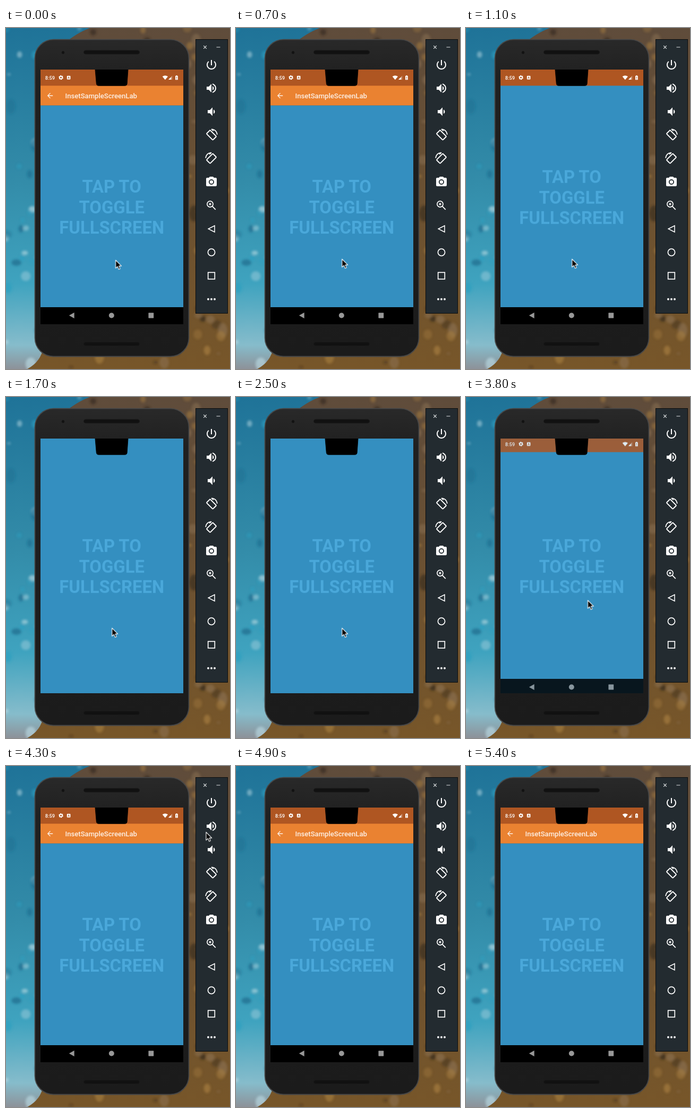
Animation of 422 by 640 pixels, one loop 5500 ms. Source, as an HTML page:

```html
<!DOCTYPE html>
<html lang="en">
<head>
<meta charset="utf-8">
<title>Fullscreen toggle</title>
<style>
  html, body { margin: 0; width: 100%; height: 100%; overflow: hidden; background: #6b4f30; }
  svg { display: block; position: absolute; left: 0; top: 0; }
  text { font-family: Roboto, sans-serif; }
  .label { font-weight: 700; font-size: 32.8px; text-anchor: middle; fill: #4aa8da; }
  .title { font-weight: 500; font-size: 13.1px; fill: #fdf0e6; }
  .clock { font-weight: 500; font-size: 9.3px; fill: #fff; }
  .line { fill: none; stroke: #fff; stroke-width: 1.7; }
</style>
</head>
<body>
<svg width="422" height="640" viewBox="0 0 422 640">
  <defs>
    <linearGradient id="sea" x2="0" y2="1">
      <stop offset="0" stop-color="#1f7398"/>
      <stop offset=".45" stop-color="#338ca9"/>
      <stop offset=".75" stop-color="#3fa3bf"/>
      <stop offset=".93" stop-color="#86bccb"/>
      <stop offset="1" stop-color="#8d9299"/>
    </linearGradient>
    <linearGradient id="rock" x2="0" y2="1">
      <stop offset="0" stop-color="#5f4c3b"/>
      <stop offset="1" stop-color="#775629"/>
    </linearGradient>
    <linearGradient id="shell" x2="0" y2="1">
      <stop offset="0" stop-color="#292929"/>
      <stop offset=".12" stop-color="#202020"/>
      <stop offset="1" stop-color="#1b1b1b"/>
    </linearGradient>
    <filter id="soft" x="-50%" y="-50%" width="200%" height="200%"><feGaussianBlur stdDeviation="2"/></filter>
    <clipPath id="screen"><rect x="65" y="78" width="269" height="478"/></clipPath>
    <clipPath id="water"><path id="coast" d="M0 0H158Q122 14 100 40L70 600Q66 626 40 640H0Z"/></clipPath>
  </defs>

  <rect width="422" height="640" fill="url(#rock)"/>
  <g id="land" filter="url(#soft)"></g>
  <use href="#coast" fill="url(#sea)"/>
  <g clip-path="url(#water)"><g id="foam" filter="url(#soft)"></g></g>

  <rect x="54.5" y="21.7" width="290" height="594.8" rx="35" fill="url(#shell)" stroke="#474747" stroke-width="1.8"/>
  <g fill="#111" stroke="#191919">
    <rect x="146.5" y="42" width="105" height="7" rx="3.5"/>
    <rect x="146.5" y="589.5" width="105" height="7" rx="3.5"/>
    <circle cx="107.5" cy="46" r="2.5"/>
  </g>

  <g clip-path="url(#screen)">
    <rect x="65" y="78" width="269" height="478" fill="#348fc0"/>
    <g id="label" class="label">
      <text x="199.2" y="309">TAP TO</text>
      <text x="199.2" y="347.5">TOGGLE</text>
      <text x="199.2" y="386">FULLSCREEN</text>
    </g>
    <g id="appBar">
      <rect x="65" y="145" width="269" height="1" fill="#2c7199" opacity=".6"/>
      <rect x="65" y="108" width="269" height="37.3" fill="#ea8231"/>
      <path transform="translate(75.2 119.2) scale(.65)" fill="#fdf0e6" d="M20 11H7.83l5.59-5.59L12 4l-8 8 8 8 1.41-1.41L7.83 13H20z"/>
      <text class="title" x="111.5" y="132">InsetSampleScreenLab</text>
    </g>
    <g id="status">
      <rect x="65" y="78" width="269" height="30.3" fill="#af5622"/>
      <text class="clock" x="73.7" y="96.5">8:59</text>
      <g fill="none" stroke="#fff">
        <circle cx="103.5" cy="93" r="2.5" stroke-width="1.8"/>
        <circle cx="103.5" cy="93" r="3.6" stroke-width="1.4" stroke-dasharray="1.9 1.87"/>
      </g>
      <rect x="114.8" y="89.7" width="6.6" height="6.8" rx="1" fill="#fff"/>
      <path d="M116.6 95L118.1 91.3 119.6 95M117.1 94H119.1" fill="none" stroke="#af5622" stroke-width=".8"/>
      <path d="M294.6 91Q299.8 87.4 305 91L299.8 97.2Z" fill="#fff"/>
      <path d="M306 97L313.2 89.6V97Z" fill="#fff" opacity=".4"/>
      <path d="M306 97L310.6 92.3V97Z" fill="#fff"/>
      <path d="M319 90H320.2V89H322.6V90H323.8V97.3H319Z" fill="#fff"/>
      <path d="M321.4 91.5V94M321.4 95V96" stroke="#af5622"/>
    </g>
    <g id="nav">
      <rect x="65" y="524" width="269" height="32"/>
      <g fill="#989898">
        <path d="M118.8 539.5L128.6 534V545Z"/>
        <circle cx="198.8" cy="539.5" r="5"/>
        <rect x="268.4" y="534.6" width="9.8" height="9.8" rx=".6"/>
      </g>
    </g>
    <path d="M168 78H230L228.2 104Q228 108.3 223.8 108.3H174.6Q170.6 108.3 170.2 104Z" stroke="#000" stroke-width=".8"/>
  </g>

  <rect x="357.5" y="21.5" width="60" height="514" fill="#232b30" stroke="#0b0d0e"/>
  <path d="M372.2 33.2L377.8 38.8M377.8 33.2L372.2 38.8M396.5 36H403.5" stroke="#dfe2e3" stroke-width="1.2"/>
  <g id="tools" fill="#fff"></g>

  <path id="cursor" d="M0 0V15L3.5 11.8 5.8 17.2 8.4 16.1 6.1 10.9H10.8Z" stroke="#fff" stroke-width="1.1" stroke-linejoin="round"/>
</svg>

<script>
const $ = id => document.getElementById(id);

// Soft seeded patches for the wallpaper
let seed = 7;
const rnd = () => (seed = seed * 16807 % 2147483647) / 2147483647;
function patches(id, count, width, colors) {
  for (let i = 0; i < count; i++) {
    const x = rnd() * width, y = rnd() * 640, r = 3 + rnd() * 7;
    $(id).innerHTML += `<ellipse cx="${x}" cy="${y}" rx="${r}" ry="${r * (0.6 + rnd())}"
      fill="${colors[i % colors.length]}" opacity="${0.3 + rnd() * 0.4}"/>`;
  }
}
patches('foam', 70, 150, ['#b9d9e2', '#1b688a', '#2b9fc0']);
patches('land', 160, 422, ['#33281d', '#a57c3f', '#8d7356']);

// Toolbar icons on a 24 px grid
const path = (d, attrs = '') => `<path d="${d}" ${attrs}/>`;
const rotate = `<rect class="line" style="stroke-width:2" x="3.6" y="7.2" width="16.8" height="9.6" rx="1.3" transform="rotate(45 12 12)"/>
  <path class="line" d="M12 .9Q21.6 1.6 23 11M12 .9L15.8 4"/>`;
const icons = [
  path('M13 3h-2v10h2zM17.83 5.17l-1.42 1.42C17.99 7.86 19 9.81 19 12c0 3.87-3.13 7-7 7s-7-3.13-7-7c0-2.19 1.01-4.14 2.58-5.42L6.17 5.17C4.23 6.82 3 9.26 3 12c0 4.97 4.03 9 9 9s9-4.03 9-9c0-2.74-1.23-5.18-3.17-6.83z'),
  path('M3 9v6h4l5 5V4L7 9zM16.5 12c0-1.77-1.02-3.29-2.5-4.03v8.05c1.48-.73 2.5-2.25 2.5-4.02zM14 3.23v2.06c2.89.86 5 3.54 5 6.71s-2.11 5.85-5 6.71v2.06c4.01-.91 7-4.49 7-8.77s-2.99-7.86-7-8.77z'),
  path('M18.5 12c0-1.77-1.02-3.29-2.5-4.03v8.05c1.48-.73 2.5-2.25 2.5-4.02zM5 9v6h4l5 5V4L9 9z'),
  rotate,
  `<g transform="matrix(-1 0 0 1 24 0)">${rotate}</g>`,
  path('M9 2L7.17 4H4c-1.1 0-2 .9-2 2v12c0 1.1.9 2 2 2h16c1.1 0 2-.9 2-2V6c0-1.1-.9-2-2-2h-3.17L15 2zM12 17c-2.76 0-5-2.24-5-5s2.24-5 5-5 5 2.24 5 5-2.24 5-5 5z', 'fill-rule="evenodd"') +
    '<circle cx="12" cy="12" r="3.2"/>',
  '<circle class="line" cx="9.5" cy="9.5" r="5.6"/><path class="line" d="M13.7 13.7L19.8 19.8M9.5 7V12M7 9.5H12"/>',
  path('M6.2 12L18 6V18Z', 'class="line" style="stroke-width:1.5"'),
  '<circle class="line" cx="12" cy="12" r="6.6"/>',
  '<rect class="line" x="5.7" y="5.7" width="12.6" height="12.6"/>',
  [6, 12, 18].map(x => `<circle cx="${x}" cy="12" r="2"/>`).join('')
];
$('tools').innerHTML = icons.map((icon, i) =>
  `<g transform="translate(375 ${57 + i * 44})">${icon}</g>`).join('');

const LOOP = 5500;
const play = (id, frames) => $(id).animate(frames, { duration: LOOP, iterations: Infinity });
const pose = (ms, x, y, opacity = 1) =>
  ({ offset: ms / LOOP, transform: `translate(${x}px, ${y}px)`, opacity });

// Slides a part away at hideAt and back in at showAt
function toggle(id, dy, hideAt, showAt, length, away = 0) {
  const frames = [
    pose(0, 0, 0), pose(hideAt, 0, 0), pose(hideAt + length, 0, dy, away),
    pose(showAt, 0, dy, away), pose(showAt + length, 0, 0), pose(LOOP, 0, 0)
  ];
  play(id, frames.map(frame => ({ ...frame, easing: 'ease-out' })));
}
toggle('appBar', -37.5, 750, 3900, 250);
toggle('label', -18.3, 750, 3900, 250, 1);
toggle('status', -31, 1150, 3600, 300);
toggle('nav', 32, 1150, 3600, 300);

play('cursor', [
  pose(0, 206.6, 435.7), pose(500, 199.7, 433.7), pose(3700, 199.7, 433.7),
  pose(4300, 376.7, 124.7), pose(4600, 445, -20), pose(LOOP, 445, -20)
]);
</script>
</body>
</html>
```
